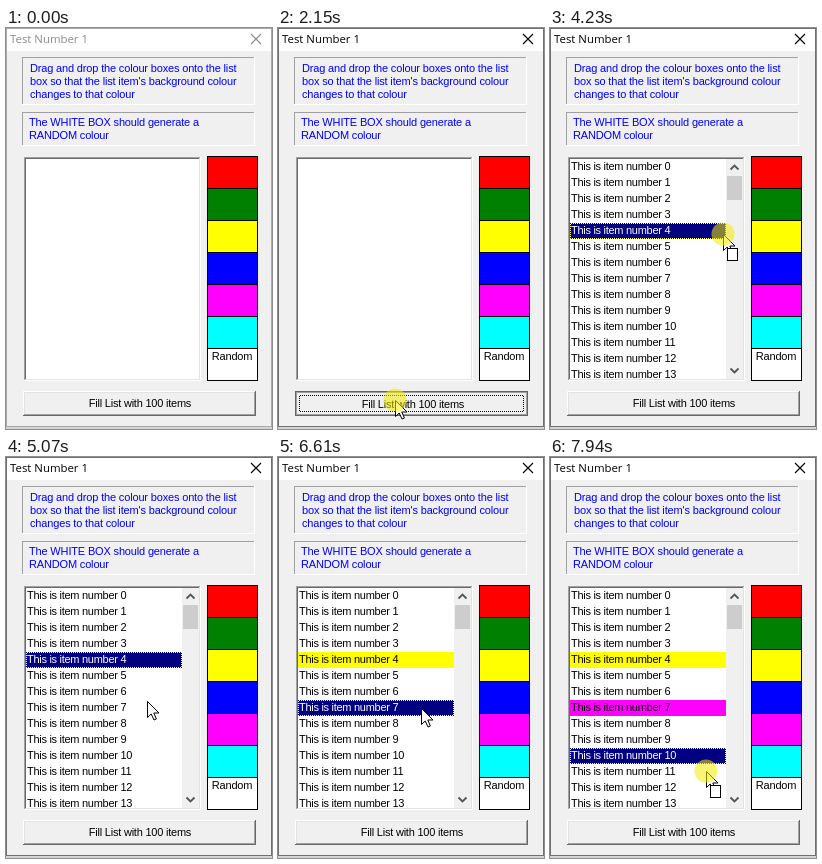
An HTML page that plays this animation: 266x401 px, repeating every 8 s.

```html
<!DOCTYPE html>
<html lang="en">
<head>
<meta charset="utf-8">
<title>Test Number 1</title>
<style>
  html, body { margin: 0; width: 100%; height: 100%; overflow: hidden; background: #f0f0f0; }
  svg { display: block; }
  rect { shape-rendering: crispEdges; }
  text { font: 11px "Liberation Sans", Arial, sans-serif; letter-spacing: -0.28px; white-space: pre; }
  .label { fill: #00f; letter-spacing: -0.16px; }
  .caption { letter-spacing: -0.22px; text-anchor: middle; }
  .title { font: 11.4px "Open Sans", "Noto Sans", sans-serif; letter-spacing: 0; }
  .focus { fill: none; stroke-width: 1; stroke-dasharray: 1 1; stroke-dashoffset: 1.5; }
</style>
</head>
<body>
<svg id="stage" width="266" height="401" viewBox="0 0 266 401"></svg>
<script>
const LOOP = 8000, ROW = 16;
const FACE = '#f0f0f0', LIGHT = '#e3e3e3', SHADOW = '#a0a0a0', DARK = '#696969', FRAME = '#646464';
const stage = document.getElementById('stage');

function add(parent, tag, attrs, text) {
  const node = document.createElementNS('http://www.w3.org/2000/svg', tag);
  for (const key in attrs) node.setAttribute(key, attrs[key]);
  if (text) node.textContent = text;
  return parent.appendChild(node);
}
const box = (parent, x, y, width, height, fill) => add(parent, 'rect', { x, y, width, height, fill });
const write = (parent, x, y, text, attrs) => add(parent, 'text', { x, y, ...attrs }, text);
const show = (node, on) => node.setAttribute('visibility', on ? 'inherit' : 'hidden');

// One-pixel edges around a face.
function bevel(parent, x, y, w, h, topLeft, bottomRight, face) {
  box(parent, x, y, w, h, bottomRight);
  box(parent, x, y, w - 1, h - 1, topLeft);
  box(parent, x + 1, y + 1, w - 2, h - 2, face);
}
const dotted = (parent, x, y, width, height, stroke) =>
  add(parent, 'rect', { x: x + .5, y: y + .5, width: width - 1, height: height - 1, stroke, class: 'focus' });

// Window
box(stage, 0, 0, 266, 401, '#d4d4d4');
const frame = box(stage, 0, 0, 266, 399, '#aaa');
box(stage, 1, 1, 264, 397, FACE);
box(stage, 1, 1, 264, 22, '#fff');
const title = write(stage, 4, 15, 'Test Number 1', { class: 'title' });
const cross = add(stage, 'path', { d: 'M245 6l10 10m0-10l-10 10', fill: 'none', 'stroke-width': 1.1 });

// Instructions
function panel(y, h, textX, textY, lines) {
  bevel(stage, 16, y, 233, h, SHADOW, '#fff', FACE);
  lines.forEach((line, i) => write(stage, textX, textY + 13 * i, line, { class: 'label' }));
}
panel(29, 48, 24, 44, ['Drag and drop the colour boxes onto the list',
  "box so that the list item's background colour", 'changes to that colour']);
panel(84, 34, 23, 98, ['The WHITE BOX should generate a', 'RANDOM colour']);

// Palette
['#f00', '#008000', '#ff0', '#00f', '#f0f', '#0ff', '#fff'].forEach((fill, i) => {
  box(stage, 201, 128 + 32 * i, 51, 33, '#000');
  box(stage, 202, 129 + 32 * i, 49, 31, fill);
});
write(stage, 226, 332, 'Random', { class: 'caption' });

// List
bevel(stage, 18, 129, 177, 224, SHADOW, '#fff', '#fff');
bevel(stage, 19, 130, 175, 222, DARK, LIGHT, '#fff');
const list = add(stage, 'svg', { x: 20, y: 131, width: 173, height: 220, overflow: 'hidden' });
const rows = Array.from({ length: 14 }, (_, i) => ({
  back: box(list, 0, ROW * i, 156, ROW, '#fff'),
  text: write(list, 1, ROW * i + 11, 'This is item number ' + i)
}));
const rowFocus = dotted(list, 0, 0, 156, ROW, '#ffff7f');
box(list, 156, 0, 17, 220, FACE);
box(list, 157, 17, 15, 24, '#cdcdcd');
add(list, 'path', {
  d: 'M160.5 10.5l4-4 4 4M160.5 209.5l4 4 4-4', fill: 'none', stroke: '#555', 'stroke-width': 1.8
});

// Button in its three states
function button(draw, shift) {
  const group = add(stage, 'g', {});
  draw(group);
  write(group, 134 + shift, 379 + shift, 'Fill List with 100 items', { class: 'caption' });
  return group;
}
function raised(group, x, y, w, h) {
  bevel(group, x, y, w, h, '#fff', DARK, FACE);
  bevel(group, x + 1, y + 1, w - 2, h - 2, LIGHT, SHADOW, FACE);
}
const buttons = {
  idle: button(g => raised(g, 17, 363, 233, 25), 0),
  pressed: button(g => {
    box(g, 17, 363, 233, 25, FRAME);
    bevel(g, 18, 364, 231, 23, SHADOW, SHADOW, FACE);
    dotted(g, 21, 367, 225, 17, '#000');
  }, 1),
  focused: button(g => {
    box(g, 17, 363, 233, 25, FRAME);
    raised(g, 18, 364, 231, 23);
    dotted(g, 21, 367, 225, 17, '#000');
  }, 0)
};

// Pointer, with the click halo laid over it
const pointer = add(stage, 'g', {});
const arrow = add(pointer, 'path', {
  d: 'M.5 .5V16.5L4.2 13L7 19L9.4 18L6.8 12H12Z', fill: '#fff', stroke: '#000', 'stroke-width': 1
});
const parcel = add(pointer, 'rect', { x: 4.5, y: 14.5, width: 10, height: 12, fill: '#fff', stroke: '#000' });
const noDrop = add(pointer, 'g', { fill: 'none', transform: 'translate(5.5 6)' });
for (const [stroke, width] of [['#000', 4], ['#fff', 2]])
  add(noDrop, 'path', {
    d: 'M-6 0a6 6 0 1 0 12 0a6 6 0 1 0-12 0M-4.2 4.2L4.2-4.2', stroke, 'stroke-width': width
  });
const halo = add(pointer, 'circle', { r: 11.5, fill: 'rgba(245,235,0,.55)' });

// Moves: first step, last step, number of steps, points passed after the previous stop
const moves = [
  [310, 700, 6, [167, 383]],
  [850, 1600, 11, [138, 265], [100, 239], [80, 300], [117, 371]],
  [1690, 1690, 1, [117, 372]],
  [2450, 3230, 11, [129, 300], [115, 200]],
  [3545, 4005, 7, [209, 206]],
  [4170, 4230, 2, [190, 206], [173, 206]],
  [4330, 4380, 2, [161, 206]],
  [4530, 4710, 3, [158, 206]],
  [4860, 5085, 4, [135, 256]],
  [5310, 5685, 6, [209, 269]],
  [5910, 6150, 4, [143, 251]],
  [6690, 6920, 4, [132, 300]],
  [7100, 7400, 5, [222, 351]],
  [7565, 7940, 6, [156, 314]]
];
// Mouse down, mouse up, dragging a colour
const presses = [
  [2150, 2300], [3320, 3470], [4080, 4710, true], [5160, 5310],
  [5760, 6610, true], [7000, 7100], [7490, LOOP, true]
];

function along(points, u) {
  const at = u * (points.length - 1);
  const i = Math.min(Math.floor(at), points.length - 2);
  return points[i].map((v, k) => v + (points[i + 1][k] - v) * (at - i));
}

function position(t) {
  let spot = [181, 402];
  for (const [start, end, steps, ...points] of moves) {
    if (t < start) break;
    const gap = (end - start) / (steps - 1) || 1;
    const step = Math.min(steps, Math.floor((t - start) / gap + 1e-6) + 1);
    spot = along([spot, ...points], step / steps);
  }
  return spot.map(Math.round);
}

function drawList(t) {
  const chosen = t < 3320 ? 0 : t < 5160 ? 4 : t < 7000 ? 7 : 10;
  const paint = { 4: t >= 4710 && '#ff0', 7: t >= 6610 && '#f0f' };
  show(list, t >= 2300);
  rows.forEach(({ back, text }, i) => {
    back.setAttribute('fill', i === chosen ? '#000080' : paint[i] || '#fff');
    text.setAttribute('fill', i === chosen ? '#fff' : '#000');
  });
  rowFocus.setAttribute('y', ROW * chosen + .5);
  show(rowFocus, t >= 3320);
}

function drawPointer(t) {
  const [x, y] = position(t);
  const press = presses.find(([down, up]) => t >= down && t < up);
  const drag = Boolean(press && press[2]);
  const blocked = drag && x >= 194;
  pointer.setAttribute('transform', `translate(${x} ${y})`);
  show(halo, press);
  show(arrow, !blocked);
  show(parcel, drag && !blocked);
  show(noDrop, blocked);
}

function render(t) {
  const active = t >= 2150;
  frame.setAttribute('fill', active ? '#707070' : '#aaa');
  title.setAttribute('fill', active ? '#000' : '#8c8c8c');
  cross.setAttribute('stroke', active ? '#000' : '#8c8c8c');
  const state = !active || t >= 3320 ? 'idle' : t < 2300 ? 'pressed' : 'focused';
  for (const name in buttons) show(buttons[name], name === state);
  drawList(t);
  drawPointer(t);
}

const began = performance.now();
function tick() {
  render((performance.now() - began) % LOOP);
  requestAnimationFrame(tick);
}
tick();
</script>
</body>
</html>
```
